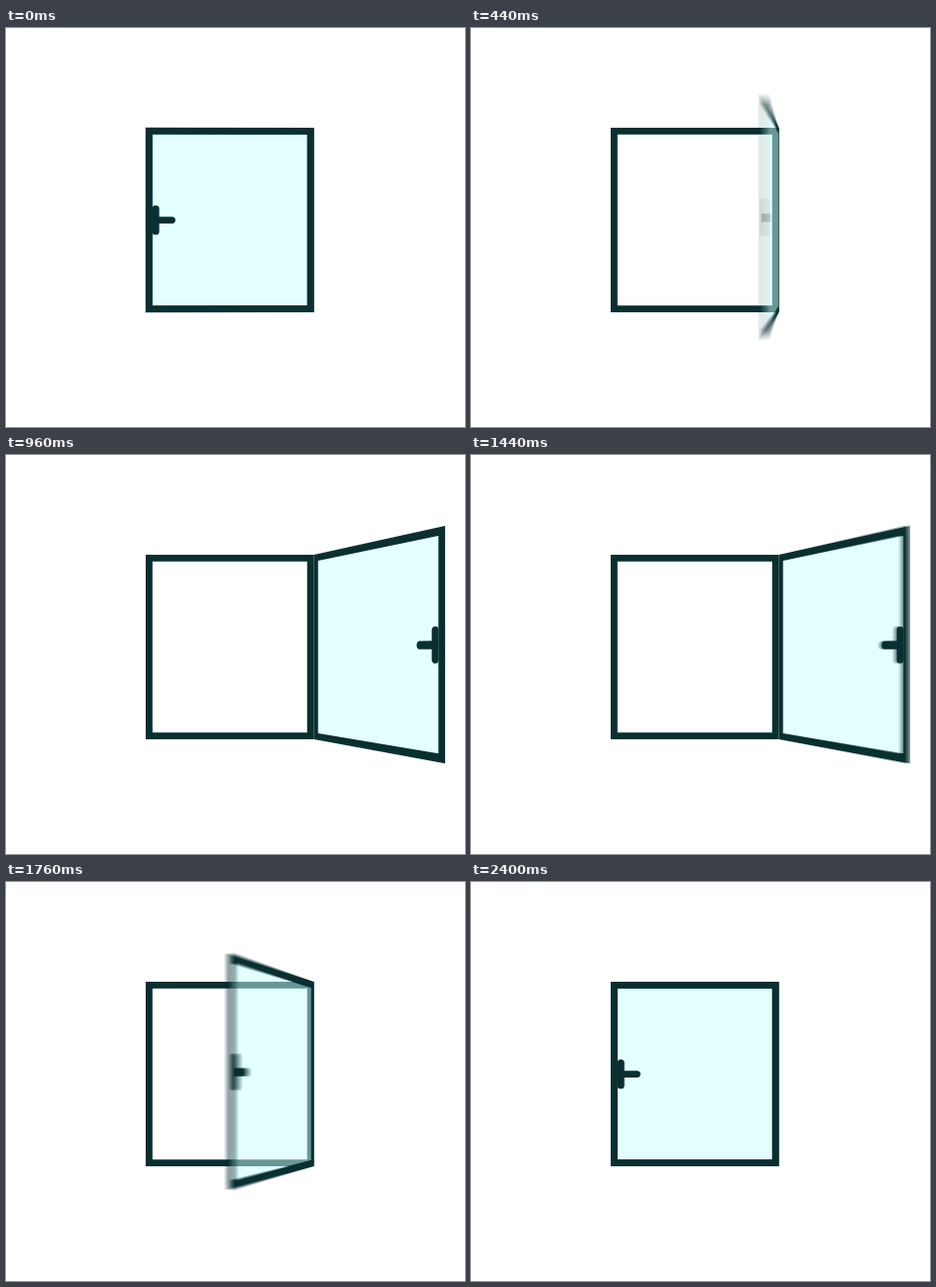
Animation, 460 px wide and 400 px high, one loop 2.88 s. Source, as an HTML page with a canvas:

```html
<!DOCTYPE html>
<html lang="en">
<head>
<meta charset="utf-8">
<title>Opening window</title>
<style>
html, body { margin: 0; width: 100%; height: 100%; overflow: hidden; background: #fff; }
canvas { display: block; }
</style>
</head>
<body>
<canvas id="stage" width="460" height="400"></canvas>
<script>
const stage = document.getElementById('stage');
const out = stage.getContext('2d');
const scene = stage.cloneNode();
const ctx = scene.getContext('2d');

const DARK = '#0a2f31', GLASS = 'rgba(199,255,255,.5)';
const LEFT = 140, RIGHT = 308.6, TOP = 100, BOTTOM = 285, BAR = 6.8;
const EYE = { x: 224.3, y: 201, dist: 656 };
const OPEN = 119.6 * Math.PI / 180;
const LOOP = 2880, MOVE = 960, HALF = 1440, STEP = 40, SHUTTER = 20, SAMPLES = 16;

// Opens, holds, closes, holds; both moves ease out on a sine.
function angleAt(ms) {
  const t = (ms + LOOP) % LOOP;
  const p = Math.sin(Math.min(t % HALF / MOVE, 1) * Math.PI / 2);
  return OPEN * (t < HALF ? p : 1 - p);
}

// Turns a point of the closed sash about the right-hand hinge.
function project([x, y], angle) {
  const u = RIGHT - x;
  const s = EYE.dist / (EYE.dist - u * Math.sin(angle));
  return [EYE.x + (RIGHT - u * Math.cos(angle) - EYE.x) * s, EYE.y + (y - EYE.y) * s];
}

// Rectangle outline with optional round corners.
function box(x0, y0, x1, y1, r = 0) {
  const pts = [];
  const n = r ? 6 : 0;
  [[x1 - r, y1 - r], [x0 + r, y1 - r], [x0 + r, y0 + r], [x1 - r, y0 + r]].forEach(([x, y], q) => {
    for (let i = 0; i <= n; i++) {
      const a = (q + (n && i / n)) * Math.PI / 2;
      pts.push([x + r * Math.cos(a), y + r * Math.sin(a)]);
    }
  });
  return pts;
}

const outer = box(LEFT, TOP, RIGHT, BOTTOM);
const inner = box(LEFT + BAR, TOP + BAR, RIGHT - BAR, BOTTOM - BAR);
const plate = box(146.6, 178, 153.7, 207.3, 3);
const lever = box(147, 189.3, 169.8, 196, 3);

function fill(color, angle, ...shapes) {
  ctx.beginPath();
  for (const shape of shapes) {
    for (const [i, pt] of shape.entries()) {
      ctx[i ? 'lineTo' : 'moveTo'](...project(pt, angle));
    }
    ctx.closePath();
  }
  ctx.fillStyle = color;
  ctx.fill('evenodd');
}

function drawScene(angle) {
  ctx.fillStyle = '#fff';
  ctx.fillRect(0, 0, 460, 400);
  fill(DARK, 0, outer, inner);
  fill(GLASS, angle, inner);
  fill(DARK, angle, outer, inner);
  fill(DARK, angle, plate);
  fill(DARK, angle, lever);
}

// Averages several moments around the given time for motion blur.
function render(ms) {
  const n = ms % HALF < MOVE ? SAMPLES : 1;
  for (let i = 0; i < n; i++) {
    drawScene(angleAt(ms + ((i + .5) / n - .5) * SHUTTER));
    out.globalAlpha = 1 / (i + 1);
    out.drawImage(scene, 0, 0);
  }
}

let last = -1;
function tick(now) {
  const ms = Math.floor(now % LOOP / STEP) * STEP;
  if (ms !== last) render(last = ms);
  requestAnimationFrame(tick);
}
requestAnimationFrame(tick);
</script>
</body>
</html>
```
